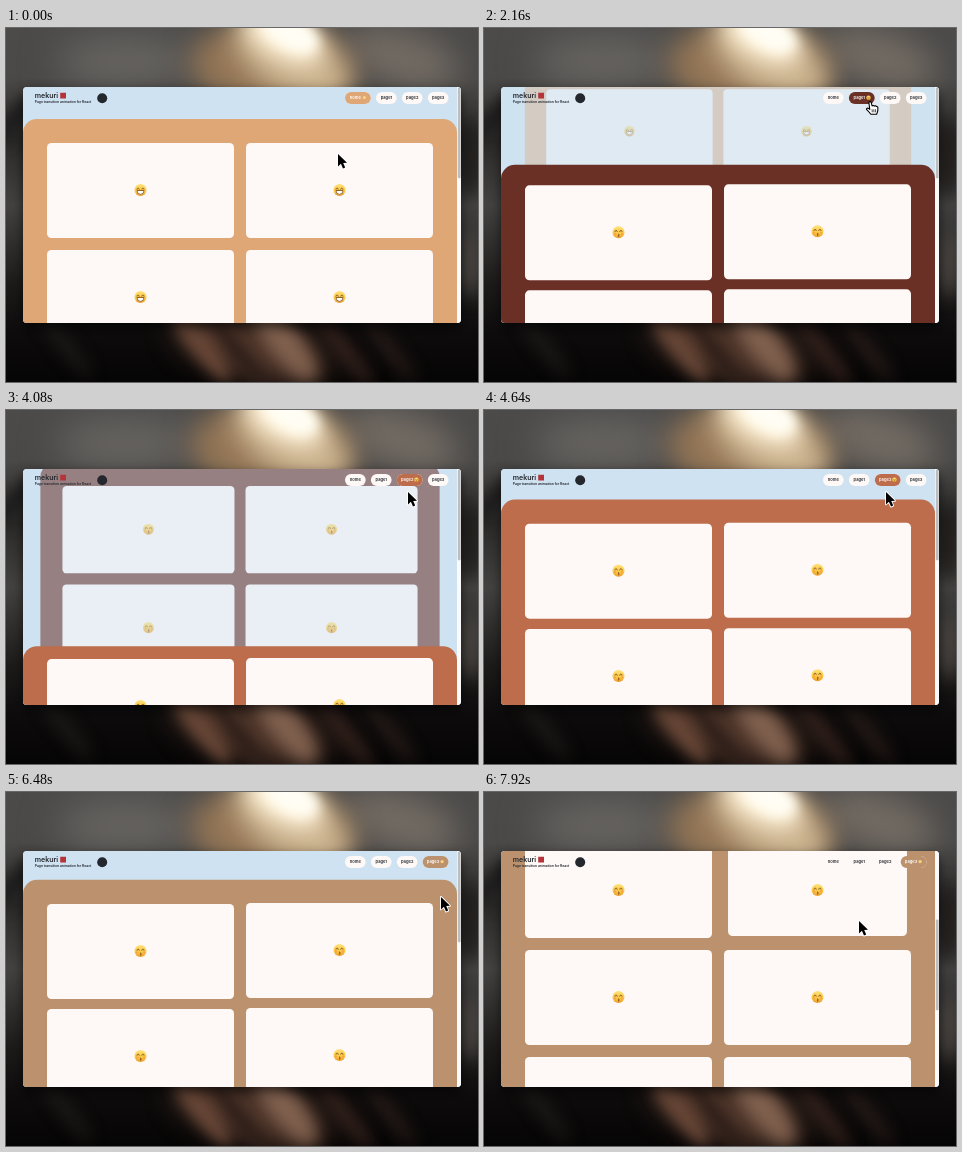
Write an HTML page with a canvas that moves like this. It is 472 by 354 pixels and loops after 8000 ms.

```html
<!DOCTYPE html>
<html lang="en">
<head>
<meta charset="utf-8">
<title>Page transition demo</title>
<style>
html, body { margin: 0; width: 472px; height: 354px; overflow: hidden; background: #1b1918; }
canvas { display: block; width: 472px; height: 354px; }
</style>
</head>
<body>
<canvas id="stage"></canvas>
<script>
const W = 472, H = 354, LOOP = 8000, STEP = 80;
const dpr = window.devicePixelRatio || 1;
const stage = document.getElementById('stage');
stage.width = W * dpr;
stage.height = H * dpr;
const ctx = stage.getContext('2d');

const FONT = 'Inter, "Open Sans", sans-serif';
const SKY = '#cfe2f1', PAPER = '#fef8f6', INK = '#24282e';
const LABELS = ['home', 'page1', 'page2', 'page3'];
const COLORS = ['#dfa676', '#6a3026', '#bd6d4b', '#bb926d'];
const CLICKS = [1600, 3640, 5560];
const WIN = { x: 17, y: 59, w: 438, h: 236 };
const PANEL = { x: 17, y: 91, w: 434 };
const CARD = { w: 187, h: 95, dx: 199, dy: 107 };

// time, x, y of the pointer tip
const PATH = [
  [0, 332, 126], [320, 332, 126], [1280, 377, 75], [1680, 377, 75],
  [2480, 391, 73], [2960, 391, 73], [3440, 405, 73], [3720, 405, 73],
  [4000, 402, 82], [4640, 402, 82], [5360, 437, 74], [5760, 437, 74],
  [6400, 435, 105], [6720, 435, 105], [7280, 375, 129], [8000, 375, 129]
];

const clamp = v => Math.max(0, Math.min(1, v));
const smooth = v => { v = clamp(v); return v * v * (3 - 2 * v); };
const mix = (a, b, p) => a + (b - a) * p;

function box(c, x, y, w, h, r, fill) {
  c.beginPath();
  c.roundRect(x, y, w, h, r);
  c.fillStyle = fill;
  c.fill();
}

function disc(c, x, y, r, fill) {
  c.beginPath();
  c.arc(x, y, r, 0, 7);
  c.fillStyle = fill;
  c.fill();
}

function text(s, x, y, size, weight, fill, align = 'left') {
  ctx.font = `${weight} ${size}px ${FONT}`;
  ctx.textAlign = align;
  ctx.textBaseline = 'middle';
  ctx.fillStyle = fill;
  ctx.fillText(s, x, y);
}

// ---- blurred backdrop, painted once ----

function paintBackdrop() {
  const cv = document.createElement('canvas');
  cv.width = stage.width;
  cv.height = stage.height;
  const c = cv.getContext('2d');
  c.scale(dpr, dpr);

  const base = c.createLinearGradient(0, 0, 0, H);
  base.addColorStop(0, '#4c4b4a');
  base.addColorStop(0.14, '#4a4948');
  base.addColorStop(0.32, '#2b2a29');
  base.addColorStop(0.5, '#434241');
  base.addColorStop(0.72, '#1d1b1a');
  base.addColorStop(0.86, '#0d0b0b');
  base.addColorStop(1, '#060505');
  c.fillStyle = base;
  c.fillRect(0, 0, W, H);

  const blob = (x, y, rx, ry, turn, color, blur) => {
    c.save();
    c.filter = `blur(${blur * dpr}px)`;
    c.beginPath();
    c.ellipse(x, y, rx, ry, turn, 0, 7);
    c.fillStyle = color;
    c.fill();
    c.restore();
  };
  // grey haze on both sides, warm light between
  blob(120, 34, 70, 26, 0, '#676461', 18);
  blob(395, 30, 60, 28, 0.3, '#736b63', 16);
  blob(266, 40, 82, 46, 0.1, '#947656', 14);
  blob(285, 30, 64, 34, 0.55, '#cdb591', 13);
  blob(278, 8, 42, 22, 0.5, '#fff3da', 10);
  blob(284, 4, 30, 16, 0.5, '#fffdf4', 6);
  blob(8, 92, 30, 10, -0.8, '#1b1a1a', 8);
  blob(464, 130, 12, 40, 0, '#211e1c', 8);
  blob(464, 235, 12, 34, 0, '#4a4542', 9);
  // slanted streaks along the lower edge
  blob(245, 318, 80, 32, 0.3, '#4b3328', 14);
  blob(196, 318, 44, 11, 0.9, '#674636', 7);
  blob(278, 314, 48, 16, 0.9, '#80604e', 8);
  blob(234, 326, 40, 6, 0.9, '#2c1d18', 6);
  blob(338, 322, 44, 9, 0.9, '#33211b', 8);
  blob(384, 322, 40, 6, 0.9, '#2b1e1a', 8);
  blob(60, 318, 40, 6, 0.9, '#1f1c1b', 8);

  c.shadowColor = 'rgba(0,0,0,.6)';
  c.shadowBlur = 12 * dpr;
  c.shadowOffsetY = 5 * dpr;
  box(c, WIN.x, WIN.y, WIN.w, WIN.h, 4, SKY);
  return cv;
}
const backdrop = paintBackdrop();

// ---- motion ----

function pointer(t) {
  let i = 1;
  while (i < PATH.length - 1 && PATH[i][0] < t) i++;
  const [t0, x0, y0] = PATH[i - 1], [t1, x1, y1] = PATH[i];
  const p = smooth((t - t0) / (t1 - t0));
  return { x: mix(x0, x1, p), y: mix(y0, y1, p) };
}

const scrollAt = t => 171 * smooth((t - 6680) / 1080);

// underdamped spring from 1 to 0
function spring(u) {
  if (u <= 0) return 1;
  return Math.exp(-8 * u) * (Math.cos(7 * u) + 8 / 7 * Math.sin(7 * u));
}

const cardRect = (i, scroll) => ({
  x: 41 + (i % 2) * CARD.dx,
  y: 115 + (i >> 1) * CARD.dy - scroll
});

// share of the last 160 ms the pointer spent over the card
function hover(i, t) {
  let n = 0;
  for (let k = 0; k < 5; k++) {
    const at = t - k * 40;
    if (at < 6760) continue;
    const p = pointer(at), r = cardRect(i, scrollAt(at));
    if (p.x > r.x && p.x < r.x + CARD.w && p.y > r.y && p.y < r.y + CARD.h) n++;
  }
  return n / 5;
}

// ---- drawing ----

function face(x, y, r, grin) {
  const g = ctx.createLinearGradient(0, y - r, 0, y + r);
  g.addColorStop(0, '#ffe27a');
  g.addColorStop(0.6, '#fcc844');
  g.addColorStop(1, '#e99a2c');
  disc(ctx, x, y, r, g);
  ctx.strokeStyle = '#7a4a1c';
  ctx.lineWidth = r * 0.13;
  ctx.lineCap = 'round';
  const arc = (ax, ay, ar, from, to) => {
    ctx.beginPath();
    ctx.arc(ax, ay, ar, from, to);
    ctx.stroke();
  };
  for (const s of [-1, 1]) {
    arc(x + s * r * 0.4, y - r * 0.12, r * 0.2, Math.PI, 0);
    if (!grin) disc(ctx, x + s * r * 0.6, y + r * 0.22, r * 0.2, 'rgba(240,120,60,.4)');
  }
  if (grin) {
    ctx.beginPath();
    ctx.arc(x, y + r * 0.15, r * 0.58, 0, Math.PI);
    ctx.closePath();
    ctx.fillStyle = '#fff';
    ctx.fill();
    ctx.stroke();
  } else {
    arc(x, y + r * 0.4, r * 0.1, -1.6, 1.6);
    arc(x, y + r * 0.6, r * 0.1, -1.6, 1.6);
  }
}

function drawPage(page, top, shift, t, scroll = 0) {
  box(ctx, PANEL.x, PANEL.y + top - scroll, PANEL.w, 640, [14, 14, 0, 0], COLORS[page]);
  for (let i = 0; i < 10; i++) {
    const r = cardRect(i, scroll);
    const cx = r.x + CARD.w / 2, cy = r.y + CARD.h / 2 + top + shift(i);
    const s = page === 3 ? 1 - 0.043 * hover(i, t) : 1;
    box(ctx, cx - CARD.w * s / 2, cy - CARD.h * s / 2, CARD.w * s, CARD.h * s, 4.5, PAPER);
    face(cx, cy - 0.5, 6, page === 0);
  }
}

function drawOld(page, age, t) {
  const p = clamp((age - 120) / 640);
  const dip = Math.sin(Math.PI * clamp(age / 240));
  const s = 1 - 0.16 * p, ox = 234, oy = 177;
  ctx.save();
  ctx.translate(ox, oy - 88 * p);
  ctx.scale(s, s);
  ctx.translate(-ox, -oy);
  drawPage(page, 0, i => (12 - i) * dip, t);
  ctx.restore();
  // the sky tint veils the leaving page
  ctx.globalAlpha = 0.9 * p;
  ctx.fillStyle = SKY;
  ctx.fillRect(WIN.x, WIN.y, PANEL.w, WIN.h);
  ctx.globalAlpha = 1;
}

function drawPills(current, previous, p, tip) {
  let x = 339, over = false;
  LABELS.forEach((label, i) => {
    const on = i === current ? p : i === previous ? 1 - p : 0;
    const w = 20.7 + 5.1 * on;
    const hit = tip.x > x - 1 && tip.x < x + w + 1.5 && tip.y > 63 && tip.y < 77;
    over = over || hit;
    box(ctx, x, 64, w, 12, 6, hit ? '#e0e6f0' : PAPER);
    if (on > 0) {
      ctx.globalAlpha = on;
      box(ctx, x, 64, w, 12, 6, COLORS[i]);
      if (i === 0 || i === 3) disc(ctx, x + w - 6.4, 69.6, 1.6, '#ffd27a');
      else face(x + w - 6.2, 69.8, 2.2, false);
      ctx.globalAlpha = 1;
    }
    text(label, x + 10.4, 70.2, 4.1, 600, on > 0.5 ? '#fff' : INK, 'center');
    x += w + 5.2;
  });
  return over;
}

function drawArrow(x, y) {
  ctx.save();
  ctx.translate(x, y);
  ctx.beginPath();
  [[0, 0], [0, 12.4], [2.9, 9.8], [5, 14.6], [7.2, 13.6], [5.2, 9], [9, 8.8]]
    .forEach(q => ctx.lineTo(...q));
  ctx.closePath();
  ctx.lineJoin = 'round';
  ctx.strokeStyle = '#fff';
  ctx.lineWidth = 1.8;
  ctx.stroke();
  ctx.fillStyle = '#000';
  ctx.fill();
  ctx.restore();
}

function drawHand(x, y) {
  ctx.save();
  ctx.translate(x, y);
  ctx.beginPath();
  ctx.moveTo(-1.2, 0.8);
  ctx.quadraticCurveTo(0, -0.9, 1.2, 0.8);
  ctx.lineTo(2, 4.2);
  ctx.quadraticCurveTo(3.4, 3.2, 4.2, 4.4);
  ctx.quadraticCurveTo(5.4, 3.5, 6.1, 4.8);
  ctx.quadraticCurveTo(7.5, 4.4, 7.8, 6);
  ctx.quadraticCurveTo(8.2, 9, 6.6, 12.6);
  ctx.lineTo(0.8, 12.6);
  ctx.quadraticCurveTo(-1, 10, -3.6, 7.6);
  ctx.quadraticCurveTo(-3.4, 5.8, -1.4, 6.8);
  ctx.lineTo(-0.3, 7.6);
  ctx.closePath();
  ctx.fillStyle = '#fff';
  ctx.fill();
  ctx.strokeStyle = '#000';
  ctx.lineWidth = 1.1;
  ctx.lineJoin = 'round';
  ctx.stroke();
  ctx.beginPath();
  for (const fx of [2, 3.7, 5.4]) {
    ctx.moveTo(fx, 7.6);
    ctx.lineTo(fx + 0.2, 10.6);
  }
  ctx.lineWidth = 0.7;
  ctx.stroke();
  ctx.restore();
}

function drawHeader() {
  text('mekuri', 28.8, 67.8, 7, 600, INK);
  box(ctx, 54.2, 64.8, 5.8, 5.8, 0, '#b5343a');
  text('Page transition animation for React', 28.8, 74.2, 3.35, 600, INK);
  disc(ctx, 96.2, 70.2, 5, INK);
}

function drawScrollbar(scroll) {
  ctx.fillStyle = '#fafafa';
  ctx.fillRect(451, WIN.y, 4, WIN.h);
  box(ctx, 451.8, 59.5 + scroll * 68 / 171, 2.8, 91, 1.4, '#bdbdbd');
}

function render(t) {
  const page = CLICKS.filter(c => t >= c).length;
  const age = page ? t - CLICKS[page - 1] : 9999;
  const scroll = scrollAt(t), tip = pointer(t);

  ctx.setTransform(1, 0, 0, 1, 0, 0);
  ctx.drawImage(backdrop, 0, 0);
  ctx.setTransform(dpr, 0, 0, dpr, 0, 0);

  ctx.save();
  ctx.beginPath();
  ctx.roundRect(WIN.x, WIN.y, WIN.w, WIN.h, 4);
  ctx.clip();
  ctx.fillStyle = SKY;
  ctx.fillRect(WIN.x, WIN.y, WIN.w, WIN.h);

  const u = (age - 348) / 1000;
  if (age < 800) drawOld(page - 1, age, t);
  if (u > 0) {
    const k = spring(u), lag = 1 - smooth((u - 0.575) / 0.3);
    drawPage(page, 204 * k, i => -15.6 * k - i * lag, t, scroll);
  }
  drawScrollbar(scroll);
  drawHeader();
  const over = drawPills(page, page - 1, smooth(age / 120), tip);
  if (t >= 5440 && t < 5920) {
    box(ctx, 17, 289.5, 40, 5.5, [0, 2, 0, 0], '#d2d2d0');
    text('localhost:3000/page3', 18, 292.5, 3.7, 500, '#222');
  }
  ctx.restore();
  (over ? drawHand : drawArrow)(tip.x, tip.y);
}

const start = performance.now();
function tick() {
  const t = (performance.now() - start) % LOOP;
  render(Math.floor(t / STEP) * STEP);
  requestAnimationFrame(tick);
}
tick();
</script>
</body>
</html>
```
